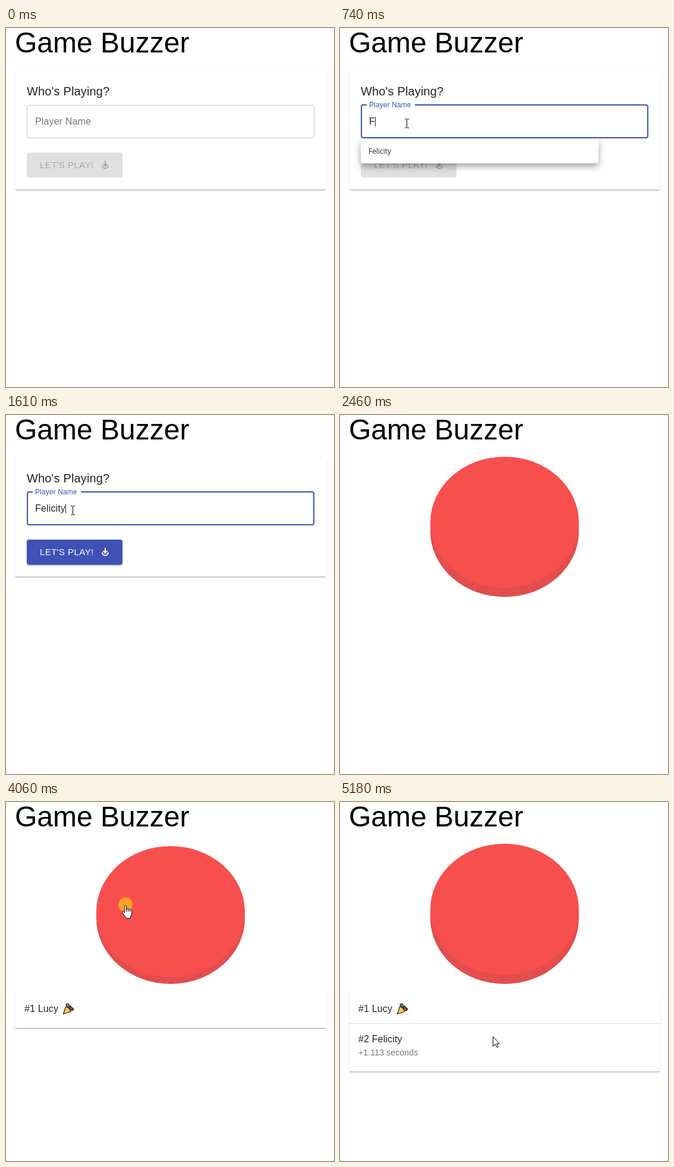
An HTML page for the animation above (5.31 s loop, 552 px wide and 602 px high).

```html
<!DOCTYPE html>
<html lang="en">
<head>
<meta charset="utf-8">
<title>Game Buzzer</title>
<style>
  html, body { margin: 0; width: 100%; height: 100%; overflow: hidden; background: #fff; }
  body { position: relative; font: 16px/17px "Liberation Sans", Arial, sans-serif; color: rgba(0,0,0,.87); }
  [hidden] { display: none !important; }
  h1, h2, p, div, svg { position: absolute; margin: 0; box-sizing: border-box; }
  h1, h2, p { white-space: pre; font-weight: 400; letter-spacing: .00938em; }
  svg { overflow: visible; }

  h1 { left: 15px; top: -2px; font-size: 48px; line-height: 53px; letter-spacing: 0; color: #000; }
  h2 { left: 35px; top: 95px; font-size: 20px; line-height: 22px; letter-spacing: .0075em; }

  .card {
    left: 15px; width: 524px; border-radius: 4px; background: #fff;
    box-shadow: 0 2px 1px -1px rgba(0,0,0,.2), 0 1px 1px rgba(0,0,0,.14), 0 1px 3px rgba(0,0,0,.12);
  }
  .form { top: 70px; height: 201px; }

  #field { left: 35px; top: 129px; width: 484px; height: 56px; border: 1px solid rgba(0,0,0,.23); border-radius: 4px; }
  #field.hover { border-color: rgba(0,0,0,.87); }
  #field.focus { top: 128px; height: 57px; border: 2px solid #3f51b5; }
  .notch { left: 45px; top: 128px; width: 81px; height: 2px; background: #fff; }
  #label, #input { left: 49px; top: 148px; }
  #label { transform-origin: 0 0; }
  #input i { position: absolute; top: 1px; height: 16px; border-left: 1px solid #222; }

  .button {
    left: 35px; top: 209px; width: 161px; height: 42px; border-radius: 4px;
    background: #e0e0e0; color: #a6a6a6;
  }
  .button p { left: 22px; top: 12px; font-size: 15px; letter-spacing: .02857em; }
  .button svg { left: 125px; top: 14px; fill: none; stroke: currentColor; stroke-width: 2; }
  #active {
    background: #3f51b5; color: #fff;
    box-shadow: 0 3px 1px -2px rgba(0,0,0,.2), 0 2px 2px rgba(0,0,0,.14), 0 1px 5px rgba(0,0,0,.12);
  }

  .popup {
    left: 35px; top: 187px; width: 400px; height: 40px; border-radius: 0 0 3px 3px;
    background: #fff; box-shadow: 0 5px 12px rgba(0,0,0,.36);
  }
  .popup p { left: 13px; top: 11px; font: 12px/17px "Open Sans", sans-serif; letter-spacing: 0; }

  .buzzer {
    left: 152px; top: 70px; width: 250px; height: 220px; border-radius: 50%;
    background: #f74f4e; box-shadow: 0 15px #e24d4d;
  }
  .buzzer.pressed { top: 74px; box-shadow: 0 11px #e24d4d; }

  .ranking { top: 315px; padding: 8px 0; }
  .row { position: relative; height: 48px; }
  .row + .row { height: 73px; border-top: 1px solid #e0e0e0; }
  .row p { left: 16px; top: 15px; }
  .row + .row p { top: 17px; }
  .row p.gap { top: 40px; font-size: 14px; line-height: 16px; letter-spacing: .01071em; color: rgba(0,0,0,.54); }
  .popper { left: 80px; top: 14px; }

  #cursor { left: 0; top: 0; fill: #fff; stroke: #000; }
</style>
</head>
<body>
<h1>Game Buzzer</h1>

<div data-on="0 1790">
  <div class="card form"></div>
  <h2>Who's Playing?</h2>
  <div id="field"></div>
  <div class="notch" data-on="460 1790"></div>
  <p id="label">Player Name</p>
  <p id="input" data-on="398 1790"><span id="typed"></span><i></i></p>
  <div class="button"></div>
  <div class="button" id="active"></div>
  <div class="popup" data-on="740 1610"><p>Felicity</p></div>
</div>

<div data-on="1790 5310">
  <div class="buzzer" data-on="1790 4060"></div>
  <div class="buzzer pressed" data-on="4060 4700"></div>
  <div class="buzzer" data-on="4700 5310"></div>
  <div class="card ranking" data-on="3020 5310">
    <div class="row">
      <p>#1 Lucy</p>
      <svg class="popper" width="20" height="20" stroke="#222" stroke-width="1.2" stroke-linejoin="round">
        <path fill="#3c91ad" d="M6 2l4-1 1 3 3 1-2 3-5-2z"/>
        <path fill="#a23a3a" d="M11 8l3-2 5 4-2 3-4-1z"/>
        <path fill="#f7c948" d="M1.500 18.500L5.500 6Q12 8 14 14.500Z"/>
      </svg>
    </div>
    <div class="row" data-on="4210 5310">
      <p>#2 Felicity</p>
      <p class="gap">+1.113 seconds</p>
    </div>
  </div>
</div>

<svg id="cursor" width="1" height="1">
  <circle id="click" r="12" fill="#fba026" stroke="none"/>
  <path id="arrow" d="M.5 .5V16.500L4.300 13L7 18.500L9.300 17.500L6.800 12H11.500Z"/>
  <path id="beam" fill="none" d="M-3 -7.500H-1L.5 -6.500L2 -7.500H4M.5 -6.500V6.500M-3 7.500H-1L.5 6.500L2 7.500H4"/>
  <path id="hand" d="M-1.500 2Q0 -.5 1.500 2V8Q3 6.300 4.500 8Q6.500 7 7.700 9Q9.500 8 10.800 10V16Q10.500 18 8.500 20V23H1Q.5 21 -3 17L-5.500 13Q-5 11 -3.300 12L-1.500 13.500ZM1.500 8V12M4.500 8V12M7.700 9V12"/>
</svg>

<script>
const LOOP = 5310;
const NAME = "Felicity";
const KEY_TIMES = [740, 1080, 1200, 1280, 1330, 1480, 1550, 1610];
const $ = id => document.getElementById(id);
const clamp = x => Math.min(1, Math.max(0, x));
const mix = (a, b, p) => a + (b - a) * p;
const easeOut = p => 1 - (1 - p) ** 3;

for (const button of document.querySelectorAll(".button"))
  button.innerHTML = `<p>LET'S PLAY!</p>
    <svg width="14" height="14"><path d="M7 0V8M3.500 5L7 8.500L10.500 5M2 7.500A5 5 0 1 0 12 7.500"/></svg>`;

const timed = [...document.querySelectorAll("[data-on]")].map(el => {
  const [from, to] = el.dataset.on.split(" ").map(Number);
  return { el, from, to };
});

// The pointer is sampled in discrete steps, as in a screen recording.
function glide(t, start, step, count, from, to, ease = p => p) {
  const p = ease(clamp((Math.floor((t - start) / step) + 1) / count));
  return [mix(from[0], to[0], p), mix(from[1], to[1], p)];
}

function pointer(t) {
  if (t < 40) return null;
  if (t < 1790) {
    const [x, y] = glide(t, 40 + 50, 50, 6, [19, 504], [112, 160], p => 1 - (1 - p) ** 2);
    return { x, y, shape: y < 185 ? "beam" : "arrow" };
  }
  if (t < 2410) return { x: 110, y: 159, shape: "arrow" };
  if (t < 2460) return { x: 95, y: 159, shape: "arrow" };
  if (t < 3710) return null;
  if (t < 4930) {
    const [x, y] = glide(t, 3710, 45, 7, [16, 150], [201, 172], p => 1 - (1 - p) ** 2);
    return { x, y, shape: x > 155 ? "hand" : "arrow" };
  }
  const [x, y] = glide(t, 4930, 50, 6, [201, 172], [257, 393]);
  return { x, y, shape: y < 300 ? "hand" : "arrow" };
}

function drawPointer(t) {
  const at = pointer(t);
  $("cursor").style.display = at ? "" : "none";
  if (!at) return;
  $("cursor").style.transform = `translate(${Math.round(at.x)}px, ${Math.round(at.y)}px)`;
  for (const shape of ["arrow", "beam", "hand"])
    $(shape).style.display = shape === at.shape ? "" : "none";
  $("click").style.display = t >= 4020 && t < 4130 ? "" : "none";
  $("field").className = t >= 398 ? "focus" : at.shape === "beam" ? "hover" : "";
}

function render(t) {
  for (const { el, from, to } of timed) el.hidden = t < from || t >= to;

  const float = easeOut(clamp((t - 398) / 200));
  $("label").style.transform = `translateY(${-25.5 * float}px) scale(${1 - .25 * float})`;
  $("label").style.color =
    `rgba(${mix(0, 63, float)}, ${mix(0, 81, float)}, ${mix(0, 181, float)}, ${mix(.54, 1, float)})`;

  $("typed").textContent = NAME.slice(0, KEY_TIMES.filter(k => k <= t).length);
  $("active").style.opacity = easeOut(clamp((t - 745) / 250));
  if (t < 40) $("field").className = "";
  drawPointer(t);
}

let start;
function tick(now) {
  start ??= now;
  render((now - start) % LOOP);
  requestAnimationFrame(tick);
}
render(0);
requestAnimationFrame(tick);
</script>
</body>
</html>
```
